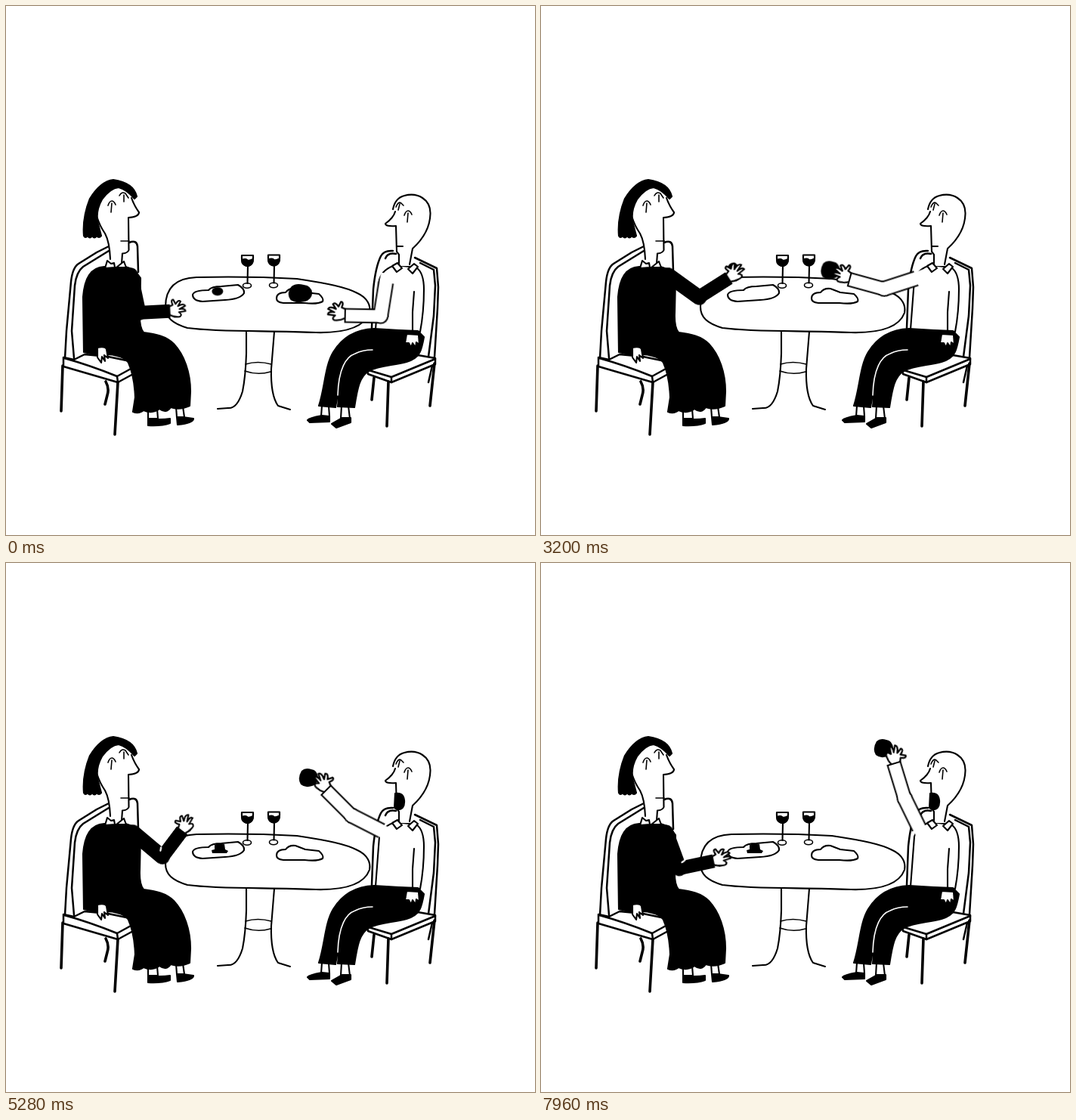
Recreate the animation shown at these times as an HTML page without scripts. Size 700x700 px, loop 8000 ms.

```html
<!DOCTYPE html>
<html lang="en">
<head>
<meta charset="utf-8">
<title>Dinner for two</title>
<style>
html, body { margin: 0; width: 100%; height: 100%; overflow: hidden; background: #fff; }
svg { display: block; width: 100vw; height: 100vh; }
.ink { fill: none; stroke: #000; stroke-width: 2.1; stroke-linecap: round; stroke-linejoin: round; }
.chair { stroke-width: 2.5; }
.paper { fill: #fff; }
.solid { fill: #000; }
.thick { stroke-width: 3.6; }
.thin { stroke-width: 1.6; }
.butt { stroke-linecap: butt; }
.white { stroke: #fff; }
.bare { stroke: none; }

.move { animation: 8s linear infinite; }
.her-upper { animation-name: her-upper; animation-timing-function: ease-in-out; }
.her-fore { animation-name: her-fore; animation-timing-function: ease-in-out; }
.her-mouth { animation-name: her-mouth; }
.fold { animation-name: fold; animation-timing-function: step-end; }
.bite { animation-name: bite; animation-timing-function: ease-in-out; }
.cake { animation-name: cake; }
.his-upper { animation-name: his-upper; }
.his-fore { animation-name: his-fore; }
.his-mouth { animation-name: his-mouth; }
.roast { animation-name: roast; }

@keyframes her-upper {
  0% { transform: rotate(78deg); }
  14.5% { transform: rotate(43deg); }
  29.5% { transform: rotate(32deg); }
  51% { transform: rotate(40deg); }
  66% { transform: rotate(40deg); }
  82% { transform: rotate(52deg); }
  99.5%, 100% { transform: rotate(70deg); }
}
@keyframes her-fore {
  0% { transform: rotate(-81deg) scaleX(.97); }
  14.5% { transform: rotate(-52deg) scaleX(1.06); }
  29.5% { transform: rotate(-87deg) scaleX(1.06); }
  51% { transform: rotate(-48deg) scaleX(1.15); }
  66% { transform: rotate(-93deg) scaleX(1.02); }
  82% { transform: rotate(-85deg) scaleX(1.03); }
  99.5%, 100% { transform: rotate(-82deg) scaleX(1.09); }
}
@keyframes her-mouth {
  0%, 10%, 15%, 41%, 100% { transform: scale(0); }
  5% { transform: scale(.8); }
  26%, 33% { transform: scale(1); }
}
@keyframes fold {
  0% { opacity: 0; }
  60%, 100% { opacity: 1; }
}
@keyframes bite {
  0% { transform: translate(280px, 378px); animation-timing-function: ease-out; }
  5.5% { transform: translate(238px, 250px); animation-timing-function: ease-in; }
  14.5% { transform: translate(218px, 378px); }
  17% { transform: translate(220px, 379px); }
  29.5% { transform: translate(231px, 321px) rotate(8deg) scale(1, 1.7); }
  50.9% { transform: translate(279px, 376px); opacity: 1; }
  51%, 100% { transform: translate(279px, 376px); opacity: 0; }
}
@keyframes cake {
  0%, 50.9% { transform: translate(279px, 376px); opacity: 0; }
  51% { transform: translate(279px, 376px); opacity: 1; }
  55%, 100% { transform: translate(283px, 378px); opacity: 1; }
}
@keyframes his-upper {
  0% { transform: rotate(99deg); }
  14.5% { transform: rotate(122deg); }
  29.5% { transform: rotate(144deg); }
  51% { transform: rotate(181deg); }
  66% { transform: rotate(207deg); }
  82% { transform: rotate(242deg); }
  99.5%, 100% { transform: rotate(244deg); }
}
@keyframes his-fore {
  0% { transform: rotate(82deg); }
  14.5% { transform: rotate(63deg); }
  29.5% { transform: rotate(46deg); }
  51% { transform: rotate(20deg); }
  66% { transform: rotate(18deg); }
  82% { transform: rotate(10.6deg); }
  99.5%, 100% { transform: rotate(9deg); }
}
@keyframes his-mouth {
  0%, 42.5% { transform: scale(0); }
  51% { transform: scale(.9, .66); }
  58%, 100% { transform: scale(1); }
}
@keyframes roast {
  0% { transform: translate(389px, 380px) scale(1.25, 1); }
  14.5% { transform: translate(389px, 379px) scale(1.2, 1); }
  29.5% { transform: translate(384px, 368px); }
  51% { transform: translate(381px, 330px); }
  66% { transform: translate(400px, 284px); }
  82% { transform: translate(450px, 247px); }
  99.5%, 100% { transform: translate(453px, 245px); }
}
</style>
</head>
<body>
<svg viewBox="0 0 700 700">
  <defs>
    <path id="hand" class="ink paper" d="M40-6 45-8Q42-15 46-15L49-9Q53-15 56-12L52-6Q60-10 62-6L54-2Q62-3 62 1L53 2Q58 6 54 8 47 9 40 5Z"/>
    <g id="glass" class="ink">
      <path d="M312 330H327Q328 343 319.500 344 311 343 312 330Z"/>
      <path class="solid" d="M312 336Q317 334 319 336T327 335Q327 343 319.500 344 312 343 312 336Z"/>
      <path d="M320 344 319.500 367"/>
      <ellipse class="thin" cx="319" cy="370" rx="5.500" ry="3.200"/>
    </g>
    <path id="eye" class="ink thin" d="M-5 4Q-3-2 0-2T5 3M0 1-1 13"/>
  </defs>

  <!-- her chair -->
  <g class="ink chair">
    <path d="M78 466 80 430 86 365Q88 346 96 341L120 326 136 318M163 313Q173 309 174 318L175 352"/>
    <path d="M90 466 87 430 91 370Q93 352 102 345L136 324"/>
    <path class="paper" d="M76 465 90 468 104 461 135 464 164 470 170 486 148 498 76 477Z"/>
    <path d="M77 466Q110 475 147 490L167 479M147 490 148 498"/>
    <path class="thick" d="M75 476 73 536M148 498 144 567"/>
    <path class="thick" d="M132 497Q137 506 134 515L131 527"/>
  </g>

  <!-- her -->
  <g class="ink">
    <path class="paper" d="M188 533V546H201L200 533M225 530 226 544H236L234 530"/>
    <path class="solid" d="M188 546Q204 548 217 546V552Q206 556 188 555ZM226 544Q238 544 248 546 248 552 227 554Z"/>
    <path class="solid" d="M130 345C112 346 104 360 102 385L103 458 121 462 136 461Q156 463 162 472 170 490 171 518L168 537Q176 540 182 535 194 540 203 533 212 540 218 531 230 535 243 529L244 510C244 485 236 462 222 447 212 437 198 434 182 432Q176 425 177 405L178 360 170 349 155 344Z"/>
    <path class="paper" d="M121 452Q131 450 133 454L135 466 130 462 131 470 127 464 126 472 121 465Z"/>
    <path class="paper bare" d="M121 275Q125 240 145 239 160 241 166 253L176 273 173 279 162 280V326L153 328V345H139L138 326Q135 308 127 295Z"/>
    <path d="M166 254Q170 265 176 273 176 279 162 280L162.500 323Q161 327 154 327.500L153 341M120 278Q124 291 131 301 137 312 138 335"/>
    <path class="thin" d="M152 311H163"/>
    <path class="solid" d="M103 304Q101 280 111 255 125 232 142 230 169 234 173 252L170 255Q160 243 149 240 138 241 127 256 119 270 121 285L126 304Q123 308 120 304 117 309 114 304 111 309 108 304 105 308 103 304Z"/>
    <path class="paper" d="M131 347 134 337 139 341 143 340 144 346ZM146 346 156 338 159 346Z"/>
    <use href="#eye" x="140" y="260"/>
    <path class="thin" d="M150 251Q153 245 158 248L162 254M156 250V259"/>
    <g transform="translate(163 311)"><path class="solid move her-mouth" d="M0-7Q-8-5-8 2-4 4 0 2Z"/></g>
  </g>

  <!-- his chair -->
  <g class="ink chair">
    <path d="M512 324Q500 323 496 331 489 345 486 375L484 426M516 328Q505 326 502 334"/>
    <path d="M541 333 570 347 572 372 571 400 567 465M566 349 568 370 566 410 559 464M548 340 566 349"/>
    <path class="paper" d="M478 481 545 462 568 466V474L510 498 479 487Z"/>
    <path d="M480 482 510 491 568 467M510 491V498"/>
    <path class="thick" d="M567 473 561 529M506 497 504 556M487 492 484 521"/>
    <path d="M564 476 559 498"/>
  </g>

  <!-- table -->
  <g class="ink">
    <path d="M318 431V460Q317 490 313 510 306 533 294 532L280 533M355 431 351 480Q350 515 360 529L376 534"/>
    <path d="M317 474Q333 469 351 474M316 483Q333 489 350 484" class="thin"/>
    <path class="paper" d="M211 398C211 374 224 360 252 359 300 358 350 359 385 361 425 367 450 372 465 380 478 386 483 396 481 406 474 425 450 433 410 432 350 429 285 432 240 426 220 420 211 412 211 398Z"/>
    <path class="paper" d="M247 382Q249 376 268 376 272 371 285 371L307 369Q316 374 315 380 310 388 290 389L260 391Q247 390 247 382Z"/>
    <path class="paper" d="M358 387Q358 379 370 379 374 373 383 374L396 379 414 381Q421 387 419 391 412 395 395 393L367 393Q358 392 358 387Z"/>
  </g>
  <use href="#glass"/>
  <use href="#glass" x="35" y="-.5"/>

  <!-- his body -->
  <g class="ink">
    <path class="paper" d="M418 529 417 543H428L427 529M444 529 443 546H455L453 529"/>
    <path class="solid" d="M399 548Q401 545 418 542L428 543V550L402 551ZM431 553 445 545 456 545V551L437 558Z"/>
    <path class="paper" d="M516 343Q499 347 494 362L489 428 548 431Q553 405 553 375 553 353 543 346Z"/>
    <path d="M540 378 538 405V436"/>
    <path class="solid" d="M487 427C462 428 444 440 433 458 422 476 422 505 414 529L436 531 441 500Q446 472 465 461L487 455 462 464Q446 472 442 498L439 530 461 531C465 505 468 490 480 483 495 475 512 476 530 471 548 466 550 455 553 438L545 430 520 429Z"/>
    <path class="white thin" d="M439 515C440 480 450 464 462 460Q472 455 485 455"/>
    <path class="paper" d="M530 434 546 435 547 448 543 445 542 452 538 446 536 452 533 446 528 446Z"/>
    <path class="paper bare" d="M513 264Q523 249 540 249 561 254 561 275 560 300 537 322L534 344H520V328L516 291 502 290 513 273Z"/>
    <path d="M512 269Q515 254 527 251C545 246 562 256 561.500 275 561 297 549 311 538 321L534 342M515 272Q513 280 502 288 502 292 516 291L517 325 520 329V341M517 318H525"/>
    <path class="thin" d="M516 266Q519 258 523 261L526 264M521 262 519 270"/>
    <use href="#eye" x="532" y="273"/>
    <g transform="translate(515 316)"><path class="solid move his-mouth" d="M0-11Q11-13 12-2 13 11 2 10L-1 8Z"/></g>
  </g>

  <!-- food -->
  <ellipse class="solid move bite" rx="7.500" ry="5.800"/>
  <path class="solid move cake" d="M-7-5Q-3-8 6-6L7 1 11 3 9 6-10 6-11 2-7 1Z"/>
  <path class="solid move roast" d="M-9-9Q-4-14 4-11 12-10 13 0 12 9 5 11-4 14-10 9-15 1-9-9Z"/>

  <!-- her arm -->
  <g transform="translate(166 352)">
    <g class="move her-upper">
      <path class="ink" style="stroke-width:20" d="M4 2H55"/>
      <g transform="translate(55 0)">
        <g class="move her-fore">
          <use href="#hand"/>
          <path class="ink butt" style="stroke-width:18" d="M0 0H41"/>
          <path class="ink white move fold" d="M3-7 7-9"/>
        </g>
      </g>
    </g>
  </g>

  <!-- his arm: outline first, then the white sleeve -->
  <g transform="translate(504 358)">
    <g class="move his-upper">
      <path class="ink butt" style="stroke-width:21" d="M8 0H53"/>
      <g transform="translate(53 0)">
        <g class="move his-fore">
          <use href="#hand" transform="translate(4 2) scale(1.060 -1.060)"/>
          <circle class="solid" r="10.500"/>
          <path class="ink butt" style="stroke-width:19.500" d="M0 0H48"/>
        </g>
      </g>
    </g>
    <g class="move his-upper">
      <path class="ink butt white" style="stroke-width:16.800" d="M-4 0H53"/>
      <g transform="translate(53 0)">
        <g class="move his-fore">
          <circle class="paper" r="8.400"/>
          <path class="ink butt white" style="stroke-width:15.300" d="M0 0H46"/>
        </g>
      </g>
    </g>
  </g>
  <path class="ink paper" d="M511 344 518 340 524 347 517 352ZM532 348 540 341 545 345 538 354Z"/>
</svg>
</body>
</html>
```
